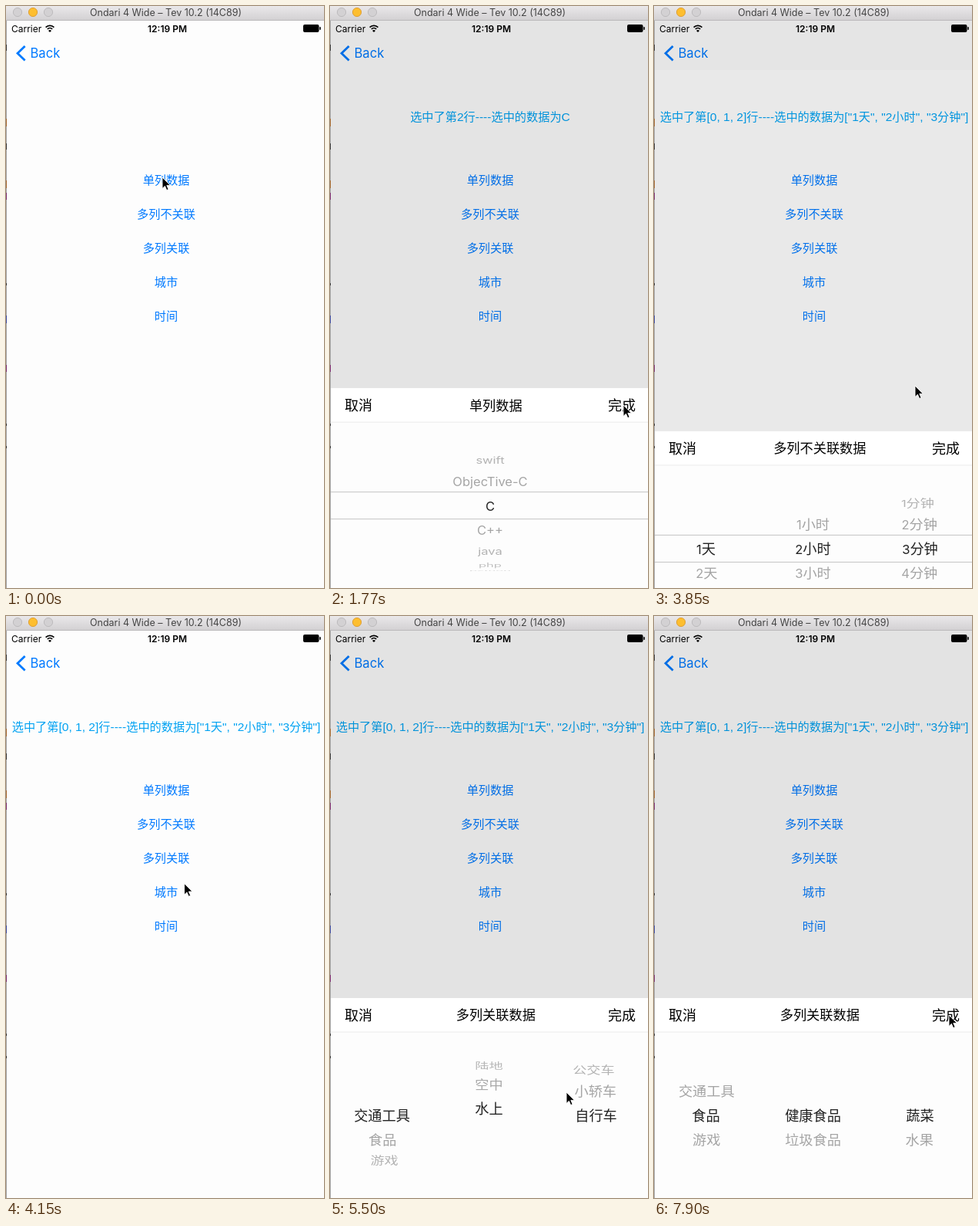
Animation of 413x754 px, one loop 8 s. Source, as an HTML page:

```html
<!DOCTYPE html>
<html lang="zh">
<head>
<meta charset="utf-8">
<title>Picker demo</title>
<style>
  html, body { margin: 0; width: 100%; height: 100%; overflow: hidden; background: #fdfdfd; }
  svg { display: block; }
  text { font-family: "Noto Sans CJK SC", "Noto Sans CJK", sans-serif; white-space: pre; }
  .ui { font-family: Inter, sans-serif; }
  .arial { font-family: "Liberation Sans", Arial, sans-serif; }
</style>
</head>
<body>
<svg width="413" height="754" viewBox="0 0 413 754">
  <defs>
    <linearGradient id="chrome" x2="0" y2="1">
      <stop stop-color="#eae8ea"/><stop offset="1" stop-color="#d3d1d3"/>
    </linearGradient>
  </defs>
  <rect width="413" height="754" fill="#fdfdfd"/>
  <g fill="none" stroke="#000" stroke-width="1.7">
    <path d="M51.6 27.6a7.6 7.6 0 0 1 10.8 0M53.8 30a4.6 4.6 0 0 1 6.4 0"/>
    <path d="M57 34l-2-2.1a2.8 2.8 0 0 1 4 0z" fill="#000" stroke="none"/>
  </g>
  <text class="ui" x="7" y="34" font-size="12">Carrier</text>
  <text class="ui" x="209.5" y="34" font-size="12" font-weight="600" text-anchor="middle">12:19 PM</text>
  <rect x="386" y="24" width="20.5" height="10" rx="2"/>
  <rect x="407.2" y="27" width="1.6" height="4" rx=".8"/>
  <path d="M24.6 52L15 61.3l9.6 9.3" fill="none" stroke="#007aff" stroke-width="2.8"/>
  <text class="ui" x="31.5" y="67.2" font-size="16.6" fill="#007aff">Back</text>
  <g id="scene"></g>
  <rect width="413" height="18" fill="url(#chrome)"/>
  <rect y="18" width="413" height="1" fill="#bbb9bb"/>
  <g fill="#d3d1d3" stroke="#bdbbbd">
    <circle cx="15" cy="8" r="5.6"/>
    <circle cx="35" cy="8" r="5.6" fill="#fdbe30" stroke="#dfa035"/>
    <circle cx="55" cy="8" r="5.6"/>
  </g>
  <text class="ui" x="207.5" y="12.8" font-size="12.5" fill="#444" text-anchor="middle">Ondari 4 Wide – Tev 10.2 (14C89)</text>
  <path d="M.5 19V754" stroke="#a2a2a2"/>
  <path d="M.5 50v8M.5 178v8M.5 359v3M.5 541v3M.5 570v3" stroke="#333"/>
  <path d="M.5 146v10M.5 226v10" stroke="#a5672c"/>
  <path d="M.5 242v9M.5 465v9" stroke="#7c2a6e"/>
  <path d="M.5 401v10" stroke="#3c4aa0"/>
  <path id="cursor" d="M0 0V14.5l3.4-3.2 2.3 5.3 2.4-1-2.3-5.2h4.7z" stroke="#fff" stroke-width=".9"/>
</svg>
<script>
const scene = document.getElementById('scene');
const cursor = document.getElementById('cursor');
const LOOP = 8000, TICK = 148.6, SLIDE = 300, SHEET = 259;
const BUTTONS = ['单列数据', '多列不关联', '多列关联', '城市', '时间'];
const COLS = [67.5, 206.5, 345.5];
const count = (n, unit) => Array.from({ length: n }, (_, i) => i + 1 + unit);

const LANGS = ['swift', 'ObjecTive-C', 'C', 'C++', 'java', 'php', 'python', 'ruby', 'js'];
const DURATION = [count(7, '天'), count(5, '小时'), count(9, '分钟')];
const TOPICS = ['交通工具', '食品', '游戏'];
const PLACES = ['陆地', '空中', '水上'];

// Each sheet: pressed, opened, confirm pressed, closed.
const SHEETS = [
  { press: 285, open: 735, done: 1620, close: 1775, title: '单列数据', lines: true,
    wheels: () => [[208, LANGS, 2]] },
  { press: 2700, open: 2709, done: 3700, close: 3762, title: '多列不关联数据', lines: true,
    wheels: () => DURATION.map((list, i) => [COLS[i], list, i]) },
  { press: 4445, open: 4452, done: 9e3, close: 9e3, title: '多列关联数据', wheels: linked }
];

const PLACE_SCROLL = [[4980, 0], [5200, 1.1], [5347, 2.7], [5495, 2.28], [5660, 2]];
const TOPIC_SCROLL = [[6540, 0], [6960, 1]];
const POINTER = [
  [740, 203, 222], [1330, 381, 517], [1850, 381, 517], [2500, 211, 267], [2830, 211, 267],
  [3410, 381, 517], [3720, 381, 517], [3861, 339, 492], [4300, 203, 308], [4470, 203, 308],
  [4900, 207, 676], [5050, 207, 672], [5347, 212, 600], [5495, 307, 617], [5940, 345, 645],
  [6100, 345, 645], [6540, 78, 685], [6830, 82, 650], [7140, 97, 667], [7160, 97, 667], [7870, 383, 517]
];

const ease = p => p < .5 ? 2 * p * p : 1 - 2 * (1 - p) ** 2;
const slide = (t, start) => ease(Math.min(1, Math.max(0, (t - start) / SLIDE)));

function at(keys, t) {
  const i = keys.findIndex(k => k[0] > t);
  if (i === 0) return keys[0].slice(1);
  if (i < 0) return keys.at(-1).slice(1);
  const a = keys[i - 1], b = keys[i], p = ease((t - a[0]) / (b[0] - a[0]));
  return a.slice(1).map((v, j) => v + (b[j + 1] - v) * p);
}

function linked(t) {
  const foods = t > 7050, water = t > 5700;
  return [
    [COLS[0], TOPICS, at(TOPIC_SCROLL, t)[0]],
    foods ? [COLS[1], ['健康食品', '垃圾食品'], 0] : [COLS[1], PLACES, at(PLACE_SCROLL, t)[0]],
    foods ? [COLS[2], ['蔬菜', '水果'], 0]
      : water ? [COLS[2], ['轮船'], 0] : [COLS[2], ['公交车', '小轿车', '自行车'], 2]
  ];
}

// Text centred on (x, y); Latin runs get their own face and size.
function label(x, y, str, size, fill, { latin = size, face = 'ui', alpha = 1, squash = 1 } = {}) {
  const runs = str.replace(/[^\u4e00-\u9fff]+/g, s => `<tspan class="${face}" font-size="${latin}">${s}</tspan>`);
  return `<text transform="translate(${x} ${y}) scale(1 ${squash})" y="${size * .37}" font-size="${size}"
    fill="${fill}" opacity="${alpha}" text-anchor="middle">${runs}</text>`;
}

function rect(y, h, fill, alpha = 1) {
  return `<rect x="1" y="${y}" width="412" height="${h}" fill="${fill}" opacity="${alpha}"/>`;
}

function wheel([cx, list, pos], mid) {
  return list.map((str, i) => {
    const d = i - pos, angle = d * .38, far = Math.abs(d);
    if (Math.abs(angle) > 1.55) return '';
    const grey = 150 + 14 * far;
    return label(cx + (207 - cx) * .0055 * d * d, mid + 85 * Math.sin(angle), str, 18.2,
      far < .5 ? '#222' : `rgb(${grey},${grey},${grey})`, { latin: 16.5, squash: Math.cos(angle) });
  }).join('');
}

function sheetView(s, t) {
  const top = 754 - SHEET * (slide(t, s.open) - slide(t, s.close));
  const pressed = t >= s.done && t < s.close;
  return rect(top, SHEET + 1, '#fdfdfd') + rect(top, 44, '#fff') + rect(top + 43.5, 1, '#ebebeb')
    + label(37, top + 22, '取消', 18, '#000')
    + label(215.3, top + 22, s.title, 17.2, '#000')
    + label(379, top + 22, '完成', 18, '#000', { alpha: pressed ? .2 : 1 })
    + (s.lines ? rect(top + 134, 1, '#c4c4c4') + rect(top + 169, 1, '#c4c4c4') : '')
    + s.wheels(t).map(w => wheel(w, top + 152)).join('');
}

function result(t) {
  const str = t < SHEETS[0].close ? '' : t < SHEETS[1].close ? '选中了第2行----选中的数据为C'
    : '选中了第[0, 1, 2]行----选中的数据为["1天", "2小时", "3分钟"]';
  return label(208, 143.5, str, 15.2, '#00a2f2', { latin: 15.55, face: 'arial' });
}

function draw(t) {
  let out = result(t);
  BUTTONS.forEach((str, i) => {
    const s = SHEETS[i];
    const alpha = s && t >= s.press ? .2 + .8 * slide(t, s.open) : 1;
    out += label(208, 225 + 44 * i, str, 15.2, '#007aff', { alpha });
  });
  const s = SHEETS.find(s => t >= s.open && t < s.close + SLIDE);
  if (s) {
    const p = slide(t, s.close);
    out += rect(19, 64, '#000', .1 * (1 - p * p)) + rect(83, 671, '#000', .1 * (1 - p)) + sheetView(s, t);
  }
  scene.innerHTML = out;
  cursor.setAttribute('transform', `translate(${at(POINTER, t).join(' ')})`);
}

const start = performance.now();
let last;
function frame() {
  const t = (performance.now() - start) % LOOP;
  const tick = Math.floor((t - 722) / TICK);
  if (tick !== last) draw(740 + TICK * (last = tick));
  requestAnimationFrame(frame);
}
frame();
</script>
</body>
</html>
```
